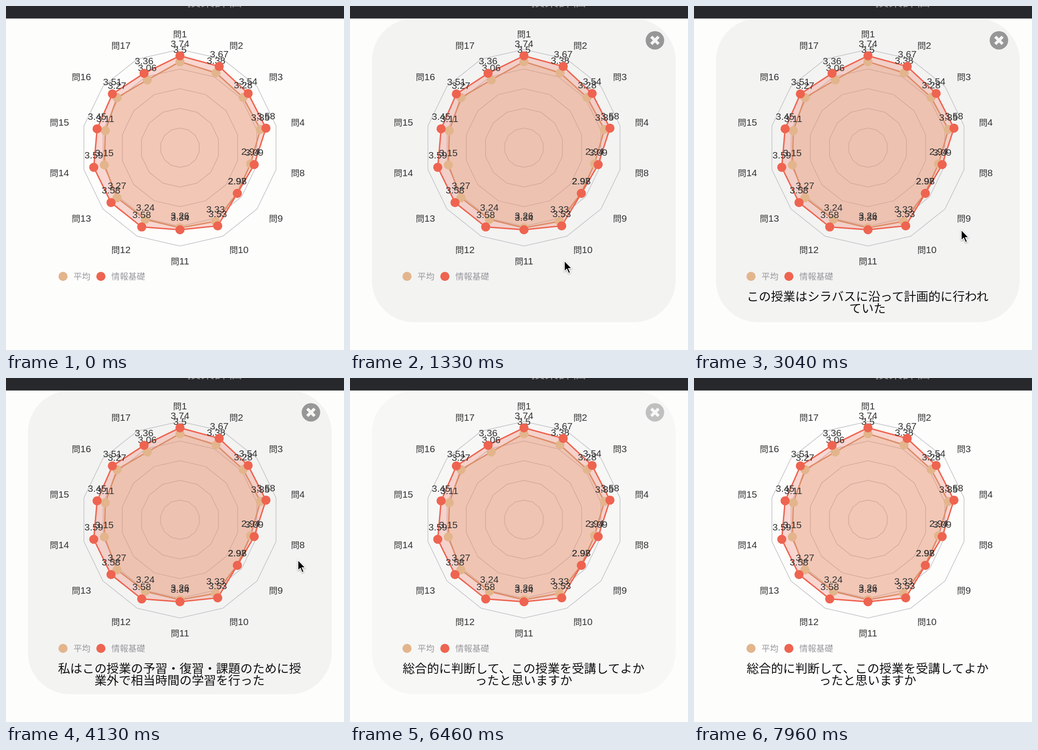
An HTML page for the animation above (8000 ms loop, 741x756 px).

```html
<!DOCTYPE html>
<html lang="ja">
<head>
<meta charset="utf-8">
<title>授業評価</title>
<style>
  html, body { margin: 0; width: 100%; height: 100%; overflow: hidden; background: #fdfdfc; }
  svg { display: block; width: 100vw; height: 100vh; }
  text { font-family: "Noto Sans CJK JP", "Noto Sans CJK", sans-serif; text-anchor: middle; }
  .axis { font-size: 18.7px; fill: #333; }
  .digits { font-family: "Liberation Sans", sans-serif; font-size: 21px; fill: #333; }
  .legend { font-size: 18.5px; fill: #99979c; text-anchor: start; }
  .question { font-size: 26.67px; fill: #111; }

  .panel, .question, #pointer, #arrow, #beam { animation: 8s linear infinite both; }
  .panel { animation-name: panel; animation-timing-function: ease-in-out; }
  #pointer { animation-name: move; animation-timing-function: ease-in-out; }
  .question, #arrow, #beam { animation-timing-function: step-end; }
  #q10 { animation-name: q10; }
  #q9 { animation-name: q9; }
  #q8 { animation-name: q8; }
  #q4 { animation-name: q4; }
  #arrow { animation-name: arrow; }
  #beam { animation-name: beam; }

  @keyframes panel {
    0%, 5.5% { opacity: 0; }
    13.5%, 76.9% { opacity: 1; }
    85.6%, 100% { opacity: 0; }
  }
  @keyframes q10 { 0%, 40.5%, 100% { opacity: 0; } 19.5% { opacity: 1; } }
  @keyframes q9 { 0%, 53.5%, 100% { opacity: 0; } 40.5% { opacity: 1; } }
  @keyframes q8 { 0%, 69.5%, 100% { opacity: 0; } 53.5% { opacity: 1; } }
  @keyframes q4 { 0% { opacity: 0; } 69.5%, 100% { opacity: 1; } }
  @keyframes arrow {
    0%, 33%, 47%, 67%, 75.5%, 100% { opacity: 1; }
    19.5%, 40.5%, 53.5%, 69.5% { opacity: 0; }
  }
  @keyframes beam {
    0%, 33%, 47%, 67%, 75.5%, 100% { opacity: 0; }
    19.5%, 40.5%, 53.5%, 69.5% { opacity: 1; }
  }
  @keyframes move {
    0%, 1% { transform: translate(750px, 765px); animation-timing-function: linear; }
    9% { transform: translate(560px, 625px); animation-timing-function: ease-out; }
    16.6% { transform: translate(470px, 560px); }
    20%, 32% { transform: translate(505px, 537px); }
    38% { transform: translate(586px, 492px); }
    41%, 46% { transform: translate(592px, 468px); }
    51.6% { transform: translate(640px, 400px); }
    54.5%, 66% { transform: translate(647px, 367px); }
    70%, 75% { transform: translate(643px, 256px); animation-timing-function: ease-in; }
    77.2%, 100% { transform: translate(760px, 246px); }
  }
</style>
</head>
<body>
<svg viewBox="0 0 741 756" preserveAspectRatio="none">
  <defs>
    <path id="beamShape" d="M-5-12.5Q0-12.5 0-8.5Q0-12.5 5-12.5M0-9V9M-5 12.5Q0 12.5 0 8.5Q0 12.5 5 12.5M-3 4H3"/>
  </defs>
  <g class="panel">
    <rect x="48" y="28" width="666" height="667" rx="92" fill="#f3f3f2"/>
    <circle cx="668.5" cy="75.5" r="20.3" fill="#979797"/>
    <path d="M660.5 67.5l16 16m0-16l-16 16" stroke="#f5f5f3" stroke-width="6.5"/>
  </g>
  <rect width="741" height="27.5" fill="#27282b"/>
  <text x="457" y="0" font-size="30" fill="#8f8f8a">授業評価</text>

  <g id="chart"></g>

  <circle cx="125" cy="594.3" r="10" fill="#e3b58c"/>
  <text class="legend" x="148" y="601">平均</text>
  <circle cx="208" cy="594.3" r="10" fill="#ee6450"/>
  <text class="legend" x="231" y="601">情報基礎</text>

  <g id="q10" class="question">
    <text x="380.5" y="648">この授業はシラバスに沿って計画的に行われ</text>
    <text x="380.5" y="674">ていた</text>
  </g>
  <g id="q9" class="question">
    <text x="380.5" y="648">私はこの授業の予習・復習・課題のために授</text>
    <text x="380.5" y="674">業外で相当時間の学習を行った</text>
  </g>
  <g id="q8" class="question">
    <text x="380.5" y="674">私はこの科目にはもともと興味があった</text>
  </g>
  <g id="q4" class="question">
    <text x="380.5" y="648">総合的に判断して、この授業を受講してよか</text>
    <text x="380.5" y="674">ったと思いますか</text>
  </g>

  <g id="pointer">
    <path id="arrow" d="M0 0V23L5.2 18.2L9.3 27.5L13 25.8L9 16.7H16Z" fill="#000" stroke="#fff" stroke-width="1.6"
      style="filter: drop-shadow(0 1.5px 1.5px #0006)"/>
    <g id="beam" fill="none">
      <use href="#beamShape" stroke="#fff" stroke-width="4"/>
      <use href="#beamShape" stroke="#000" stroke-width="2"/>
    </g>
  </g>
</svg>
<script>
  const CX = 381.4, CY = 311.4, RADIUS = 216, MAX = 4;
  const TAN = '#e3b58c', RED = '#ee6450';
  const questions = [1, 2, 3, 4, 8, 9, 10, 11, 12, 13, 14, 15, 16, 17];
  const average = [3.5, 3.38, 3.28, 3.35, 2.94, 2.97, 3.33, 3.26, 3.24, 3.27, 3.15, 3.11, 3.27, 3.06];
  const course = [3.74, 3.67, 3.54, 3.58, 3.09, 2.98, 3.53, 3.34, 3.58, 3.58, 3.59, 3.45, 3.51, 3.36];

  const polar = (r, i) => {
    const a = i * 2 * Math.PI / questions.length;
    return [CX + r * Math.sin(a), CY - r * Math.cos(a)];
  };
  const place = values => values.map((v, i) => polar(v / MAX * RADIUS, i));
  const polygon = (points, attrs) => `<polygon points="${points.join(' ')}" ${attrs}/>`;

  const rings = [1, 2, 3, 4, 5].map(n =>
    polygon(questions.map((_, i) => polar(RADIUS * n / 5, i)),
      'fill="none" stroke="#c4c4c9" stroke-width="1.5"'));

  const axes = questions.map((q, i) => {
    const [x, y] = polar(249.5, i);
    const side = Math.abs(x - CX) < 1 ? 'middle' : x > CX ? 'start' : 'end';
    return `<text class="axis" x="${x}" y="${y + 7}" style="text-anchor:${side}">問<tspan class="digits">${q}</tspan></text>`;
  });

  const area = (values, fill, stroke, opacity) =>
    polygon(place(values), `fill="${fill}" fill-opacity="${opacity}" stroke="${stroke}" stroke-width="3"`);
  const dots = (values, fill) =>
    place(values).map(([x, y]) => `<circle cx="${x}" cy="${y}" r="10" fill="${fill}"/>`).join('');
  const numbers = values =>
    place(values).map(([x, y], i) => `<text class="digits" x="${x}" y="${y - 19.5}">${values[i]}</text>`).join('');

  document.getElementById('chart').innerHTML = [
    ...rings,
    ...axes,
    area(average, '#deb887', '#d69a70', .3),
    area(course, RED, RED, .25),
    dots(average, TAN),
    numbers(average),
    dots(course, RED),
    numbers(course)
  ].join('');
</script>
</body>
</html>
```
